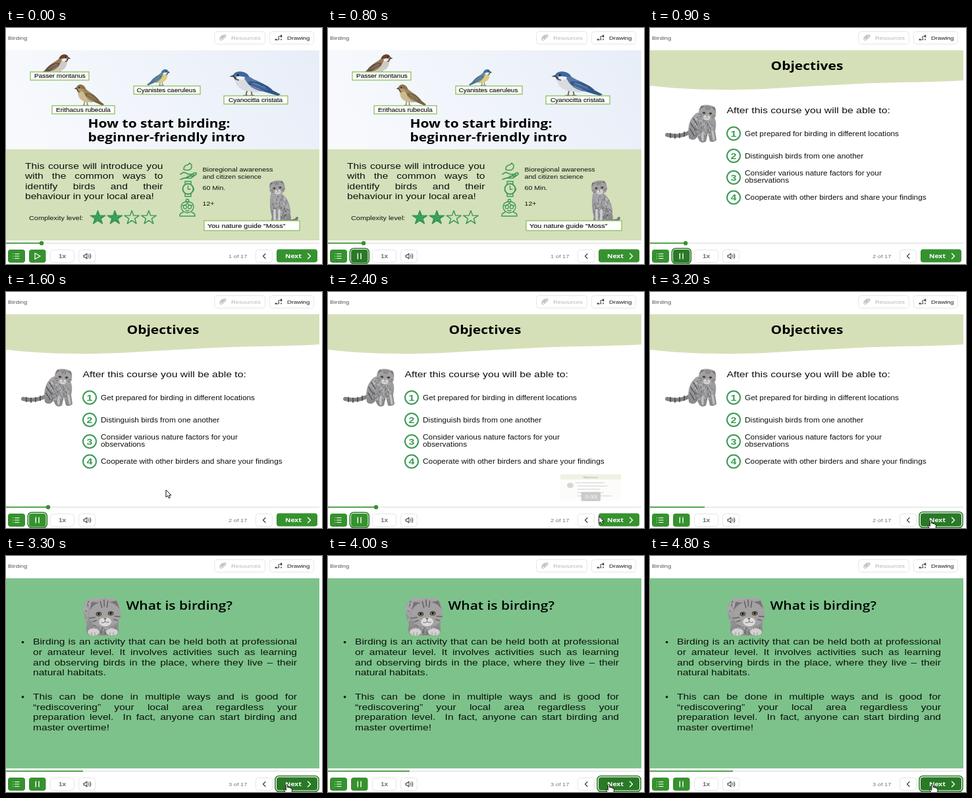
Recreate the animation shown at these times as an HTML page. Size 480 by 360 pixels, loop 5 s.

```html
<!DOCTYPE html>
<html lang="en">
<head>
<meta charset="utf-8">
<title>Birding</title>
<style>
  html, body { margin: 0; width: 100%; height: 100%; overflow: hidden; background: #fff; }
  svg { display: block; width: 480px; height: 360px; font-family: "Liberation Sans", Arial, sans-serif; }
  .title { font-family: "Open Sans", "Noto Sans", sans-serif; font-weight: 700; }
  .para { font-size: 15.6px; color: #0d120c; white-space: nowrap; }
  .para div { text-align: justify; text-align-last: justify; }
  .para div:last-child { text-align-last: left; }
  .box { fill: #fff; stroke: #e6e6e6; }
  .line { fill: none; stroke-linecap: round; stroke-linejoin: round; }
</style>
</head>
<body>
<svg id="stage" viewBox="0 0 480 360"></svg>
<script>
const GREEN = '#36922f', DARK = '#2a7927', ICON = '#3b9a55', INK = '#0d120c';
const ASPECT = 0.85; // the whole page is shown a little flattened
const TOP = 34, BOTTOM = 324;
const stage = document.getElementById('stage');

// Flattens about the middle of the capitals
const text = (x, y, s, size, extra = '') =>
  `<text transform="translate(${x} ${y - size * 0.05}) scale(1 ${ASPECT})" font-size="${size}" ${extra}>${s}</text>`;
const title = (x, y, s, extra = '') => text(x, y, s, 21, `class="title" ${extra}`);
const rect = (x, y, w, h, extra = '') =>
  `<rect x="${x}" y="${y}" width="${w}" height="${h}" ${extra}/>`;
const oval = (x, y, rx, ry, fill, extra = '') =>
  `<ellipse cx="${x}" cy="${y}" rx="${rx}" ry="${ry}" fill="${fill}" ${extra}/>`;
const hoop = (x, y, r, width = 1.4) =>
  `<circle cx="${x}" cy="${y}" r="${r}" fill="none" stroke="${ICON}" stroke-width="${width}"/>`;
const stroke = (d, color, width, extra = '') =>
  `<path class="line" d="${d}" stroke="${color}" stroke-width="${width}" ${extra}/>`;
const shape = (d, fill, extra = '') => `<path d="${d}" fill="${fill}" ${extra}/>`;

// y is the first baseline
function para(x, y, w, lead, lines) {
  const lh = lead / ASPECT;
  return `<foreignObject transform="translate(${x} ${y}) scale(1 ${ASPECT})" y="${-lh / 2 - 5.4}" width="${w}" height="100">
    <div class="para" style="line-height:${lh}px">${lines.map(l => `<div>${l}</div>`).join('')}</div>
  </foreignObject>`;
}

const label = (x, y, w, h, s, tx, size = 10) =>
  rect(x, y, w, h, 'fill="#fff" stroke="#93c468" stroke-width="1.4"') +
  text(tx, y + h - 3, s, size, 'fill="#111" stroke="#111" stroke-width=".15"');

function random(seed) {
  return () => (seed = seed * 16807 % 2147483647) / 2147483647;
}

// Short hairs scattered over an ellipse
function fur(cx, cy, rx, ry, count) {
  const rnd = random(cx * 7 + cy), paths = ['', ''];
  for (let i = 0; i < count; i++) {
    const a = rnd() * 2 * Math.PI, r = Math.sqrt(rnd());
    const x = cx + rx * r * Math.cos(a), y = cy + ry * r * Math.sin(a);
    paths[i % 2] += `M${x.toFixed(1)} ${y.toFixed(1)}l${(rnd() * 3 - 1.5).toFixed(1)} 2`;
  }
  return stroke(paths[0], '#555558', 1, 'opacity=".7"') + stroke(paths[1], '#d3d2d2', 1, 'opacity=".7"');
}

// A perched bird in a 100 x 70 box, facing right
function bird(x, y, w, h, flip, [back, belly, cap, wing, cheek]) {
  const place = flip
    ? `translate(${x + w} ${y}) scale(${-w / 100} ${h / 70})`
    : `translate(${x} ${y}) scale(${w / 100} ${h / 70})`;
  return `<g transform="${place}">
    ${stroke('M58 55L56 68M66 54L68 67M52 68H61M64 68H73', '#6d6259', 2.5)}
    ${shape('M0 65L5 69L46 52L32 42Z', wing)}
    ${shape('M20 51C32 32 50 28 62 16C68 2 88 -2 93 12C94 20 88 26 87 34C84 52 58 62 34 56Z', back)}
    ${shape('M90 20C89 26 88 30 87 36C84 54 58 62 38 57C52 52 64 42 70 24Z', belly)}
    ${shape('M62 16C68 -1 90 -1 93 12C82 11 76 18 64 17Z', cap)}
    ${shape('M16 53C28 36 48 28 63 30C66 42 46 54 18 57Z', wing)}
    ${stroke('M26 52L56 39M36 54L58 44M42 40L58 35', back, 1.8)}
    ${stroke('M30 47L54 34M40 51L60 41', '#fff', 1.2, 'opacity=".5"')}
    ${shape('M92 11L101 16L91 18Z', '#45403c')}
    ${shape('M70 18Q80 14 88 17Q84 27 72 25Z', cheek)}
    ${stroke('M91 18Q88 25 83 26', '#35322f', 2.4)}
    ${oval(84, 12, 2, 2.2, '#151515')}
  </g>`;
}

function star(x, y, full) {
  const pts = Array.from({ length: 10 }, (_, i) => {
    const r = i % 2 ? 4.6 : 11.8, a = i * Math.PI / 5;
    return [x + r * Math.sin(a), y - 0.92 * r * Math.cos(a)];
  });
  const path = p => 'M' + p.map(q => q.map(v => v.toFixed(1)).join(' ')).join('L') + 'Z';
  let out = shape(path(pts), full ? '#43ab62' : 'none',
    'stroke="#35965a" stroke-width="1.4" stroke-linejoin="round"');
  if (full) for (let i = 0; i < 10; i += 2)
    out += shape(path([[x, y], pts[i], pts[i + 1]]), '#2c8a4d', 'opacity=".65"');
  return out;
}

// Folded-ear cat head around 0,0, about 26 wide
const catHead = `<g id="head">
  ${shape('M-12.5 0Q-13 -8 -8 -11Q0 -13 8 -11Q13 -8 12.5 0Q13 6 8 9Q0 13 -8 9Q-13 6 -12.5 0Z', '#a3a1a2')}
  ${fur(0, -1, 11, 9, 70)}
  ${shape('M-12 -3L-10 -10L-4 -9Q-9 -8 -12 -3ZM12 -3L10 -10L4 -9Q9 -8 12 -3Z', '#767375')}
  ${stroke('M-3 -10L-2 -5M0 -11V-6M3 -10L2 -5M-12 3L-8 2.500M12 3L8 2.500M-10 6L-7 5M10 6L7 5', '#626063', .8)}
  ${oval(0, 6.5, 5, 3.6, '#dddbda')}
  ${oval(-4.8, 0, 2.3, 1.7, '#3b393a')}${oval(4.8, 0, 2.3, 1.7, '#3b393a')}
  ${oval(-4.8, .1, 1.6, 1.2, '#b5a464')}${oval(4.8, .1, 1.6, 1.2, '#b5a464')}
  ${oval(-4.8, 0, .9, 1.1, '#111')}${oval(4.8, 0, .9, 1.1, '#111')}
  ${shape('M-1.5 3.4H1.5L0 5Z', '#7d5f5b')}
  ${stroke('M0 5V6.5Q-1.5 7.800 -3 7M0 6.5Q1.5 7.800 3 7', '#6a6565', .5)}
</g>`;
const head = (x, y, k, turn = 0) =>
  `<use href="#head" transform="translate(${x} ${y}) rotate(${turn}) scale(${k})"/>`;

const sittingCat = stroke('M424 293Q440 296 442 290', '#77777a', 4) +
  shape('M402 253Q412 247 421 254Q433 266 432 285Q436 295 424 296H405Q401 294 404 289Q399 270 402 253Z', 'url(#coat)') +
  fur(417, 274, 13, 19, 110) +
  stroke('M408 278V292M415 278V292', '#d2d0d0', 3.4) + head(412, 244, .94, -8);

const standingCat = stroke('M64 157Q46 168 26 163', '#828286', 6) +
  stroke('M31 161V167M38 162V168M45 161V167M52 159V165', '#525257', 2) +
  shape('M59 168Q55 142 70 130Q82 124 98 136Q102 145 99 157L101 171Q97 175 91 173L88 160L85 173Q79 177 75 172L72 166Q66 174 59 168Z', 'url(#coat)') +
  fur(79, 150, 17, 16, 130) +
  stroke('M66 138L72 148M62 145L69 156M61 154L67 164', '#5b5b60', 1.6) +
  stroke('M80 160V171M95 158L97 170', '#c1c0c2', 3.4) +
  head(87, 130, 1.05, 6);

const lyingCat = shape('M119 72Q126 62 140 64H164Q175 70 172 92Q170 100 171 116Q166 124 154 121H130Q119 121 123 104Q115 88 119 72Z', 'url(#coat)') +
  fur(131, 85, 13, 19, 70) + fur(147, 111, 20, 9, 70) +
  oval(133, 116, 9, 5.5, '#d3d0cf') + oval(161, 116, 9, 5.5, '#d3d0cf') +
  stroke('M130 117V121M135 117V121M158 117V121M163 117V121', '#8d8b8e', .9) +
  head(150, 88, 1.9, -3);

const icons =
  stroke('M265 223L270 220L277 223H283Q287 224 283 226H276M277 227L286 221Q290 220 289 223L281 229H270L265 231Z', ICON, 1.6) +
  stroke('M270 216Q270 209 276 209L279 206L282 209Q283 217 275 217Z', ICON, 1.5) +
  stroke('M272 238V234H281V238M272 253V257H281V253M285 244V248M276.5 241V246H280', ICON, 1.5) +
  hoop(276.5, 245.5, 8, 2) +
  hoop(275.5, 263.5, 2.2) + hoop(272, 273, 2.6, 1.2) + hoop(279, 273, 2.6, 1.2) +
  stroke('M266 273Q266 265 275.5 265Q285 265 285 273Q284 281 275.5 282Q267 281 266 273M268 271Q274 270 275.5 267Q277 270 283 271M273 278Q275.5 280 278 278M269 281Q263 283 264 287H287Q288 283 282 281', ICON, 1.4);

const intro = `<g data-slide>
  ${rect(0, TOP, 476, 151, 'fill="url(#sky)"')}
  ${rect(0, 185, 476, BOTTOM - 185, 'fill="#d4e0ba"')}
  ${bird(52, 39, 46, 33, false, ['#96785c', '#cfcac4', '#6e4029', '#66503f', '#efece8'])}
  ${bird(104, 85, 45, 34, true, ['#9a835a', '#cdba90', '#8b7148', '#766242', '#b79a68'])}
  ${bird(214, 62, 35, 26, false, ['#6d8796', '#dccf7c', '#3d74b2', '#4c7390', '#f2f3f2'])}
  ${bird(340, 65, 77, 39, true, ['#5878a4', '#d9dbe0', '#3f669c', '#33568a', '#eceef2'])}
  ${label(37, 67, 89, 12.5, 'Passer montanus', 43)}
  ${label(70, 118.5, 95, 12.5, 'Erithacus rubecula', 76)}
  ${label(194, 88.5, 101, 12.5, 'Cyanistes caeruleus', 198.5)}
  ${label(331, 103.5, 97, 12.5, 'Cyanocitta cristata', 338)}
  ${title(124.5, 153.5, 'How to start birding:')}
  ${title(124.5, 174, 'beginner-friendly intro')}
  ${para(29, 215, 209.5, 15.4, ['This course will introduce you', 'with the common ways to', 'identify birds and their', 'behaviour in your local area!'])}
  ${text(35, 293.5, 'Complexity level:', 10.9, `fill="${INK}"`)}
  ${[0, 1, 2, 3].map(i => star(139.5 + i * 25.8, 289.5, i < 2)).join('')}
  ${icons}
  ${[['Bioregional awareness', 219.5], ['and citizen science', 230.5], ['60 Min.', 248], ['12+', 272]].map(([s, y]) => text(298.5, y, s, 10.6, `fill="${INK}"`)).join('')}
  ${sittingCat}
  ${label(301, 294, 145, 15, 'You nature guide “Moss”', 306, 10.9)}
</g>`;

const goals = [
  [161, ['Get prepared for birding in different locations']],
  [195, ['Distinguish birds from one another']],
  [228, ['Consider various nature factors for your', 'observations']],
  [258.5, ['Cooperate with other birders and share your findings']]
];
const objectives = `<g data-slide>
  ${shape('M0 34H476V80C430 83 390 82 340 84S240 89 190 92S70 96 0 88Z', '#d5e0b9')}
  ${title(183.5, 65, 'Objectives')}
  ${standingCat}
  ${text(116.5, 131, 'After this course you will be able to:', 15.8, `fill="${INK}"`)}
  ${goals.map(([y, lines], i) => `<circle cx="127" cy="${y}" r="10" fill="#fff" stroke="${ICON}" stroke-width="2"/>` +
    text(127, y + 5.5, i + 1, 16, `fill="${ICON}" font-weight="700" text-anchor="middle"`) +
    lines.map((l, n) => text(144, y + 4.5 + n * 11.5 - (lines.length - 1) * 7, l, 11.85, `fill="${INK}"`)).join('')).join('')}
</g>`;

const about = `<g data-slide>
  ${rect(0, TOP, 476, BOTTOM - TOP, 'fill="#7dc28b"')}
  ${lyingCat}
  ${title(182.5, 83, 'What is birding?', 'style="font-weight:600"')}
  ${oval(25.5, 131.5, 1.9, 1.8, INK)}${oval(25.5, 215, 1.9, 1.8, INK)}
  ${para(41, 136, 401, 15.5, ['Birding is an activity that can be held both at professional', 'or amateur level. It involves activities such as learning', 'and observing birds in the place, where they live – their', 'natural habitats.'])}
  ${para(41, 219.6, 401, 15.5, ['This can be done in multiple ways and is good for', '“rediscovering” your local area regardless your', 'preparation level.&nbsp; In fact, anyone can start birding and', 'master overtime!'])}
</g>`;

const header = rect(0, 0, 480, TOP, 'fill="#fff"') +
  text(3, 18.5, 'Birding', 9.4, 'fill="#555"') +
  rect(316.5, 5.5, 77, 19, 'rx="4" class="box"') +
  stroke('M326 16L331 11Q334 9 334 13L328 18Q324 20 325 15L329 11M328 16L332 12', '#bdbdbd', 1.1) +
  text(342, 18.5, 'Resources', 9.4, 'fill="#b5b5b5"') +
  rect(400.5, 5.5, 67, 19, 'rx="4" class="box"') +
  stroke('M409 18H413Q416 18 414 15Q413 12 417 13L419 14', '#444', 1.1) +
  oval(418, 12, 1.4, 1.4, '#444') + oval(410, 17.5, 1.2, 1.2, '#444') + oval(418, 17.5, 1, 1, '#444') +
  text(427, 18.5, 'Drawing', 9.4, 'fill="#444" stroke="#444" stroke-width=".2"');

const ring = (id, x, y, w, h) =>
  rect(x, y, w, h, `id="${id}" rx="5.5" fill="#fff" stroke="${DARK}" stroke-width="1.6"`);

const footer = rect(0, BOTTOM, 480, 36, 'fill="#fff"') +
  rect(0, 327.6, 476, 1.4, 'fill="#e2e2e2"') +
  rect(0, 327.4, 54, 1.7, `id="bar" fill="${GREEN}"`) +
  `<circle id="knob" cy="328.2" r="3.2" fill="${GREEN}"/>` +
  rect(3, 338, 26, 20, `rx="4" fill="${GREEN}"`) +
  stroke('M13.5 344.5H20M13.5 348H20M13.5 351.5H20M10.5 344.5h.1M10.5 348h.1M10.5 351.5h.1', '#fff', 1.1) +
  ring('playRing', 33.3, 336.3, 29, 23) +
  rect(35, 338, 25.5, 20, `id="playBox" rx="4" fill="${GREEN}"`) +
  stroke('M44 343.5V352.5L52 348Z', '#fff', 1.3, 'id="play"') +
  stroke('M45.3 344V352M50 344V352', '#fff', 1.4, 'id="pause"') +
  rect(67.5, 338.5, 36, 19, 'rx="4" class="box"') +
  text(85.5, 351.5, '1x', 10.4, 'fill="#555" stroke="#555" stroke-width=".2" text-anchor="middle"') +
  rect(110.5, 338.5, 25, 19, 'rx="4" class="box"') +
  stroke('M118 346.5V349.5H120L123 352V344L120 346.5ZM125.5 346Q127 348 125.5 350M127.5 344.5Q130 348 127.5 351.5', '#444', 1.1) +
  `<g id="page">${text(338, 351, '', 9.3, 'fill="#777"')}</g>` +
  rect(379.5, 338.5, 25, 19, 'rx="4" class="box"') +
  stroke('M394 344.5L390.5 348L394 351.5', '#444', 1.3) +
  ring('nextRing', 409, 335.5, 66, 23.8) +
  rect(411, 337.5, 62, 20, `id="nextBox" rx="4" fill="${GREEN}"`) +
  text(424, 351.5, 'Next', 10.4, 'class="title" fill="#fff"') +
  stroke('M458.5 344L462.5 348L458.5 352', '#fff', 1.4);

const preview = `<g id="preview">
  ${rect(353, 278, 92, 40, 'fill="#f6f6f4"')}${rect(353, 278, 92, 8, 'fill="#c9d7a8"')}
  ${text(399, 284, 'Objectives', 4.5, 'font-weight="700" text-anchor="middle"')}
  ${oval(368, 295, 5, 4, '#77777a')}
  ${stroke('M376 291H420M379 296H424M379 301H413M379 306H418M379 311H430', '#555', .9)}
  ${rect(384.5, 305, 29.5, 14, 'rx="2" fill="#555"')}
  ${text(399.5, 315.3, '0:33', 9.3, 'fill="#fff" text-anchor="middle"')}
</g>`;

const cursors = `<g id="cursor" stroke="#111" stroke-linejoin="round">
  ${shape('M0 0V11L2.6 8.7L4.4 12.5L6.3 11.6L4.6 8H8Z', '#fff', 'id="arrow"')}
  ${shape('M-1.2 7V.8Q0 -1 1.2 .8V4.5Q3 3.5 3.6 5Q5.4 4.3 5.9 5.8Q8 5.5 8 7.5V10L6.5 14H-.5L-4.5 8.5Q-4 6.5 -1.2 8.8Z', '#fff', 'id="hand"')}
</g>`;

const fill = (id, a, b, dir) =>
  `<linearGradient id="${id}" ${dir}><stop stop-color="${a}"/><stop offset="1" stop-color="${b}"/></linearGradient>`;
stage.innerHTML = `<defs>
  ${fill('sky', '#f7f9fd', '#e8eef8', 'x1="0" y1=".4" x2="1" y2=".2"')}
  ${fill('coat', '#a9a8aa', '#858487', 'x2="0" y2="1"')}
  ${catHead}</defs>` + intro + objectives + about + header + footer + preview + cursors;

const LOOP = 5000, STEP = 100;
const PLAY = 500, SLIDE2 = 900, FOCUS = 2900, SLIDE3 = 3300;
// [time, x, y]
const cursorPath = [[1300, 200, 297], [1600, 243, 302], [1800, 336, 309], [2100, 395, 322],
  [2400, 411.5, 342], [2600, 424, 347], [3200, 426.5, 348.5], [4500, 426.5, 348.5], [4800, 429, 348.5]];
// [time, value]
const progress = [[900, 54], [1600, 64], [2400, 73], [3200, 83], [3299, 84], [3300, 117], [4200, 126]];
const fade = [[2000, 0], [2200, .9], [2300, .7], [2400, .3], [2500, 0]];

function at(track, t, col = 1) {
  if (t <= track[0][0]) return track[0][col];
  const i = track.findIndex(k => k[0] > t);
  if (i < 0) return track[track.length - 1][col];
  const a = track[i - 1], b = track[i];
  return a[col] + (b[col] - a[col]) * (t - a[0]) / (b[0] - a[0]);
}

const $ = id => document.getElementById(id);
const show = (el, on) => { el.style.display = on ? '' : 'none'; };
const slides = [...document.querySelectorAll('[data-slide]')];
const pageText = $('page').firstChild;

function render(t) {
  const page = t < SLIDE2 ? 0 : t < SLIDE3 ? 1 : 2;
  slides.forEach((s, i) => show(s, i === page));
  pageText.textContent = `${page + 1} of 17`;

  const x = at(progress, t);
  $('bar').setAttribute('width', x);
  $('knob').setAttribute('cx', x);
  show($('knob'), t < FOCUS);

  show($('play'), t < PLAY);
  show($('pause'), t >= PLAY);
  show($('playRing'), t >= PLAY && t < FOCUS);
  show($('nextRing'), t >= FOCUS);
  $('playBox').setAttribute('fill', t >= PLAY && t < 1300 ? DARK : GREEN);
  $('nextBox').setAttribute('fill', t >= FOCUS ? DARK : GREEN);

  $('preview').setAttribute('opacity', at(fade, t));
  show($('cursor'), t >= 1300);
  $('cursor').setAttribute('transform', `translate(${at(cursorPath, t)} ${at(cursorPath, t, 2)})`);
  show($('arrow'), t < 2500);
  show($('hand'), t >= 2500);
}

const start = performance.now();
function tick() {
  const t = (performance.now() - start) % LOOP;
  render(Math.floor(t / STEP) * STEP);
  requestAnimationFrame(tick);
}
tick();
</script>
</body>
</html>
```
